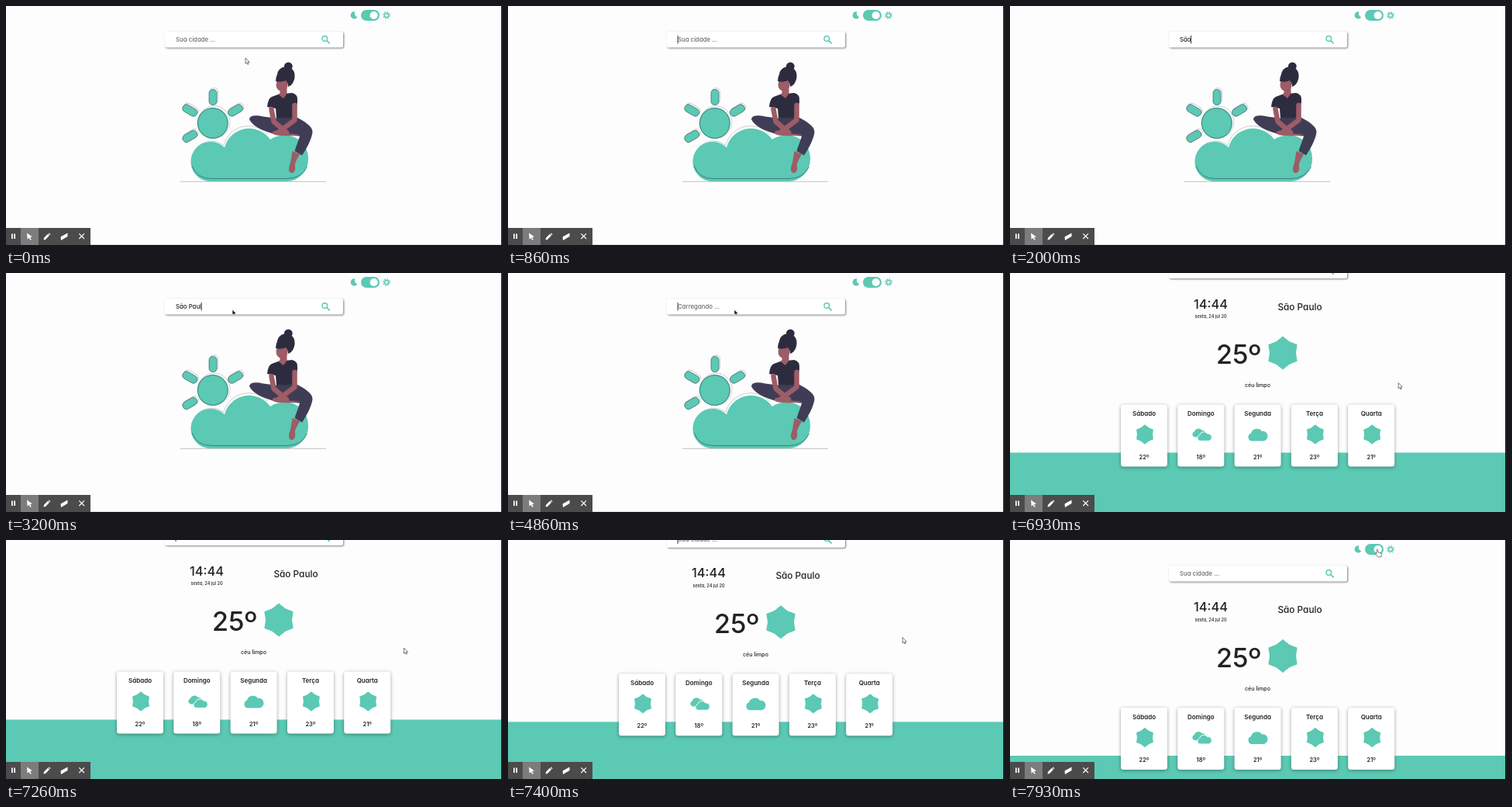
Write an HTML page that moves like this. It is 640 px wide and 308 px high and loops after 8000 ms.

```html
<!DOCTYPE html>
<html lang="pt-BR">
<head>
<meta charset="utf-8">
<style>
html, body { margin: 0; width: 100%; height: 100%; overflow: hidden; background: #fdfdfd; }
svg { display: block; width: 640px; height: 308px; }
text { font-family: Inter, Lato, sans-serif; font-weight: 500; font-feature-settings: "cv11"; fill: #222; white-space: pre; }
.mid { text-anchor: middle; }
.teal { fill: #5bc9b3; }
.skin { fill: #9d5c66; }
.dark { fill: #2d2c3f; }
.trousers { fill: #3f3d56; }
.line { fill: none; stroke: #b9b9c0; stroke-width: .7; }
.edge { fill: none; stroke: #2d4d55; stroke-width: .6; }
.arm { fill: none; stroke: #9d5c66; stroke-width: 6.5; stroke-linecap: round; stroke-linejoin: round; }
.box { fill: #fff; filter: drop-shadow(1px 1.5px 1.2px rgba(0, 0, 0, .5)); }
.card { fill: #fff; filter: drop-shadow(.5px 1.5px 2px rgba(0, 0, 0, .38)); }
</style>
</head>
<body>
<svg viewBox="0 0 640 308">
  <defs>
    <path id="star" class="teal"/>
    <path id="cloud" class="teal" d="M-8 8A5.2 5.2 0 0 1-8.600-2A8 8 0 0 1 5.500-4.600A6.300 6.300 0 0 1 7.500 8Z"/>
    <path id="arrow" d="M0 0V7.300L1.700 5.800L2.800 8.300L4 7.800L2.900 5.400H5.100Z" stroke-width=".8"/>
    <g id="hand" fill="#fff" stroke="#444" stroke-width=".7">
      <path d="M.8 0C1.700 0 1.900.7 1.900 1.500V4C3 3.600 3.700 4 3.800 4.500C4.700 4.200 5.400 4.700 5.500 5.300C6.500 5.200 6.800 5.800 6.700 6.800L6 9.800H1.800L-1.300 6.400C-1.500 5.500-.6 5.200 0 6V1C0 .4.300 0 .8 0Z"/>
    </g>
  </defs>

  <rect width="640" height="308" fill="#fdfdfd"/>
  <g id="page">
    <path class="teal" d="M450.500 7.400A4.600 4.600 0 1 0 453.300 14.200A4.700 4.700 0 0 1 450.500 7.400Z"/>
    <rect class="teal" x="458" y="5" width="24" height="14" rx="7"/>
    <circle cx="474.700" cy="12" r="5.100" fill="#fff"/>
    <g fill="none" stroke="#5bc9b3">
      <circle cx="491" cy="12" r="2.600" stroke-width="1.500"/>
      <circle cx="491" cy="12" r="4.200" stroke-width="1.500" stroke-dasharray="1.500 1.799"/>
    </g>

    <rect class="box" x="205" y="33" width="230" height="20.500" rx="2.500"/>
    <text id="field" x="219" y="46" font-size="7.800"></text>
    <rect id="caret" y="38" width=".9" height="10.500" fill="#222"/>
    <g fill="none" stroke="#5bc9b3" stroke-width="1.400">
      <circle cx="411.300" cy="42" r="3.300"/>
      <path d="M413.800 44.500L417.600 48.300" stroke-width="1.700"/>
    </g>

    <g id="welcome">
      <path class="line" d="M225 226.300H413" style="stroke:#aaa"/>
      <circle class="line" cx="268.400" cy="149.500" r="20.600"/>
      <circle class="teal" cx="266.800" cy="151" r="20"/>
      <circle class="edge" cx="266.800" cy="151" r="19.400"/>
      <g id="rays"></g>
      <path class="line" d="M240 194A26 26 0 0 1 281 179.500A33 33 0 0 1 338 166"/>
      <path class="teal" d="M265 226A25.500 25.500 0 1 1 282 182.500A33 33 0 0 1 341 172Q349 166.500 360 166.500A30 30 0 0 1 390 197A28.500 28.500 0 0 1 362 226Z"/>
      <path class="edge" d="M240 206Q246 222.500 265 222.500H362Q382 222 388.500 207"/>

      <path class="skin" d="M369.500 187L379 191C376 197 372 202 373 207C374 212 371 216 367.500 215C363.500 213 365 207 367 202Z"/>
      <path class="trousers" d="M314 146C315 140 324 141 332 142.500L351 145L372 142C386 149 396 155 395.500 163C394 173 387 185 382 192.500L372.500 187C375 179 378 172 379 167.500L357 166.500C340 165 319 157 314 146Z"/>
      <path class="skin" d="M345 161Q353 160 361 164L379 165.500Q372 168 355 167Q346 167 343.500 164Z"/>
      <path class="dark" d="M351 114L369 112Q377 113 376 124L372 145Q361 149 349 145L348 132L337 130Q338 119 343 117Z"/>
      <path class="trousers" d="M350 143.500Q361 146 372.500 142.500L374 153H348Z"/>
      <path class="arm" d="M342.500 133L345.500 149L362 163"/>
      <path class="arm" d="M372.500 128V147L351 163"/>
      <path class="skin" d="M353.500 104H362.500V113L358 119L351.500 114L353.500 112Z"/>
      <ellipse class="skin" cx="356" cy="101.500" rx="7.500" ry="8.500"/>
      <circle class="dark" cx="364.300" cy="77.800" r="5.400"/>
      <path class="dark" d="M350 88C352 75 372 75 372.500 89C373 96 369 103 364 104Q364 99 361 96Q354 99 348 97Q348 92 350 88Z"/>
    </g>

    <g id="weather">
      <text x="237" y="92" font-size="16.400">14:44</text>
      <text class="mid" x="259" y="104.500" font-size="5.600">sexta, 24 jul 20</text>
      <text class="mid" x="374" y="94" font-size="11.800">São Paulo</text>
      <text x="266" y="163.500" font-size="34">25º</text>
      <use href="#star" x="352" y="149.500"/>
      <text class="mid" x="319.500" y="193.500" font-size="7.100">céu limpo</text>
      <rect class="teal" y="278" width="640" height="80"/>
      <g id="cards"></g>
    </g>
  </g>

  <rect id="floor" y="307" width="640" height="1" fill="#ddd"/>
  <rect x="639" width="1" height="308" fill="#111"/>
  <g id="toolbar">
    <rect y="286" width="109" height="22" fill="#4b4b4b"/>
    <rect x="19" y="286" width="23" height="22" fill="#7c7c7c"/>
    <g fill="#fff">
      <path d="M7 293.500H8.700V300H7ZM10.300 293.500H12V300H10.300Z"/>
      <path d="M27 292.500L34 297.500L31 298L32.800 301L31.300 301.800L29.700 298.700L27.700 300.700Z"/>
      <path d="M48.500 301.500L49 298.800L54 293.800L56 295.800L51 301ZM54.700 293.200L55.600 292.400L57.500 294.300L56.700 295.200Z"/>
      <path d="M70.500 297.500L79.500 292.500V297L71 302Z"/>
    </g>
    <path d="M94.300 293.300L101 300M101 293.300L94.300 300" stroke="#fff" stroke-width="1.200"/>
  </g>
  <use id="cursor"/>
</svg>

<script>
const $ = id => document.getElementById(id);
const LOOP = 8000;

$("star").setAttribute("d", "M" + Array.from({ length: 12 }, (_, i) => {
  const r = i % 2 ? 17 : 21.500, a = i * Math.PI / 6;
  return (r * Math.sin(a)).toFixed(2) + " " + (-r * Math.cos(a)).toFixed(2);
}).join("L") + "Z");

const pill = (x, y, angle, cls) =>
  `<rect class="${cls}" x="-10" y="-5" width="20" height="10" rx="4.500" transform="translate(${x} ${y}) rotate(${angle})"/>`;
$("rays").innerHTML = [[267, 117.500, 90], [237.300, 134.500, 30], [296, 134.500, -30], [237.300, 168, -30]]
  .map(([x, y, a]) => pill(x + 1.500, y - 1.800, a, "line") + pill(x, y, a, "teal") + pill(x, y, a, "edge")).join("");

const sun = '<use href="#star" transform="translate(1 254.500) scale(.59)"/>';
const cloud = '<use href="#cloud" y="255"/>';
const clouds = `<use href="#cloud" transform="translate(-2.500 252.500) scale(.7)"/>
  <use href="#cloud" transform="translate(4.500 257) scale(.74)" stroke="#fff" stroke-width="1.300"/>`;
$("cards").innerHTML = [["Sábado", sun, 22], ["Domingo", clouds, 18], ["Segunda", cloud, 21], ["Terça", sun, 23], ["Quarta", sun, 21]]
  .map(([day, icon, degrees], i) => `<g transform="translate(${173 + i * 73.300} 0)">
    <rect class="card" x="-30" y="216" width="60" height="80" rx="3.500"/>
    <text class="mid" y="230.500" font-size="8" style="font-weight:600">${day}</text>${icon}
    <text class="mid" y="286" font-size="7.400" style="font-weight:600">${degrees}º</text></g>`).join("");

// Keyframes are [time, ...values], eased between neighbours.
function tween(keys, t) {
  let i = 0;
  while (i < keys.length - 2 && t >= keys[i + 1][0]) i++;
  const [a, b] = [keys[i], keys[i + 1]];
  const k = Math.min(1, Math.max(0, (t - a[0]) / (b[0] - a[0])));
  const eased = k * k * (3 - 2 * k);
  return a.slice(1).map((v, j) => v + (b[j + 1] - v) * eased);
}
const pointer = [[60, 309, 67], [500, 292, 47], [5400, 292, 47], [6130, 98, 226], [6330, 98, 226],
  [7000, 513.500, 139], [7300, 513.500, 139], [7800, 473, 12]];
const scroll = [[6330, 0], [6900, 46.500], [7330, 46.500], [7800, 0]];
const keyTimes = [1260, 1730, 2000, 2200, 2460, 2660, 2930, 3130, 3330];
const ENTER = 3800, LOADED = 5330;

function draw(t) {
  const loaded = t >= LOADED;
  $("welcome").style.display = loaded ? "none" : "";
  $("weather").style.display = loaded ? "" : "none";
  $("floor").style.display = loaded ? "none" : "";
  $("page").setAttribute("transform", `translate(0 ${-tween(scroll, t)[0]})`);

  const typed = t < ENTER ? "São\u00a0Paulo".slice(0, keyTimes.filter(k => t >= k).length) : "";
  const field = $("field");
  field.textContent = typed || (t >= ENTER && !loaded ? "Carregando ..." : "Sua cidade ...");
  field.style.fill = typed ? "#222" : "#6b6b6b";
  const caretOn = t < ENTER
    ? (t >= 500 && t < 1000) || t >= keyTimes[0]
    : Math.floor((t - ENTER) / 530) % 2 === 0;
  $("caret").style.display = caretOn ? "" : "none";
  $("caret").setAttribute("x", 218.600 + (typed ? field.getComputedTextLength() : 0));

  const [x, y] = tween(pointer, t);
  const cursor = $("cursor"), black = t >= 3130 && t < 5400;
  cursor.setAttribute("href", t >= 7900 ? "#hand" : "#arrow");
  cursor.setAttribute("transform", `translate(${x} ${y})`);
  cursor.setAttribute("fill", black ? "#111" : "#fff");
  cursor.setAttribute("stroke", black ? "#eee" : "#555");
  cursor.style.display = t >= 500 && t < 3130 ? "none" : "";
}

function frame() {
  draw(performance.now() % LOOP);
  requestAnimationFrame(frame);
}
frame();
</script>
</body>
</html>
```
